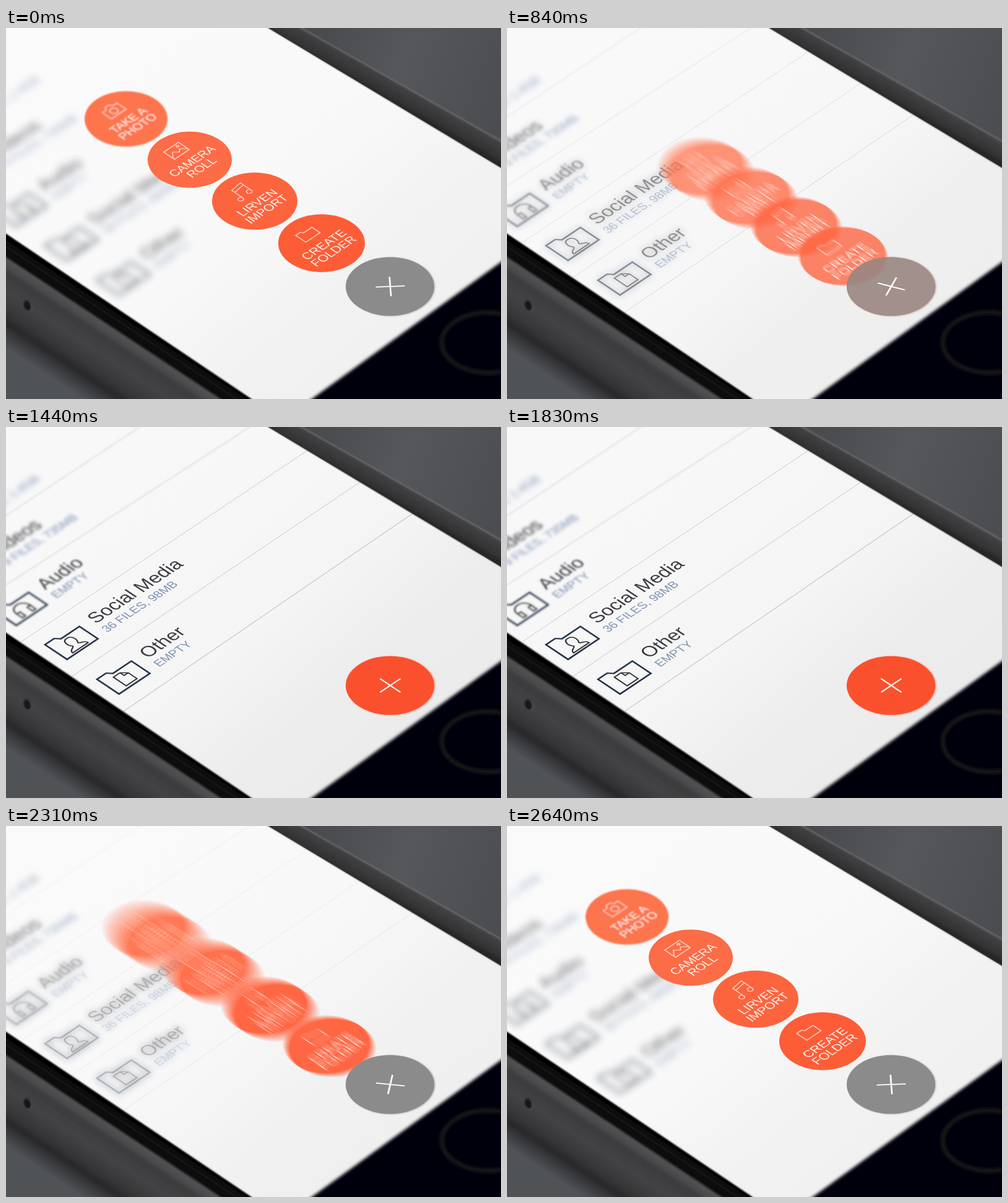
Write an HTML page that moves like this. It is 800 px wide and 600 px high and loops after 2670 ms.

```html
<!DOCTYPE html>
<html lang="en">
<head>
<meta charset="utf-8">
<title>File menu</title>
<style>
html, body { margin: 0; width: 100%; height: 100%; overflow: hidden; background: #46474b; }
svg { display: block; width: 800px; height: 600px; }
text { font-family: "Liberation Sans", Arial, sans-serif; }
.label { fill: #fff; fill-opacity: .92; font-size: 20px; text-anchor: middle; }
.line { fill: none; stroke: #fff; stroke-width: 1.6; stroke-opacity: .7; }
.title { fill: #3a3b3f; font-size: 30px; }
.sub { fill: #7c90b0; font-size: 19px; }
.folder { fill: none; stroke: #263448; stroke-width: 2.8; }
.glyph { fill: none; stroke: #303133; stroke-width: 2; }
.ghost { mix-blend-mode: plus-lighter; }
.disk { isolation: isolate; }
</style>
</head>
<body>
<svg viewBox="0 0 800 600">
  <defs id="defs">
    <linearGradient id="paper" gradientUnits="userSpaceOnUse" x1="200" y1="60" x2="620" y2="560">
      <stop offset="0" stop-color="#f8f8f9"/><stop offset=".5" stop-color="#f5f5f6"/>
      <stop offset=".75" stop-color="#ededee"/><stop offset="1" stop-color="#ebebec"/>
    </linearGradient>
    <linearGradient id="desk" gradientUnits="userSpaceOnUse" x1="470" y1="0" x2="800" y2="130">
      <stop offset="0" stop-color="#47484c"/><stop offset=".5" stop-color="#56575b"/>
      <stop offset="1" stop-color="#4c4d51"/>
    </linearGradient>
    <linearGradient id="side" gradientUnits="userSpaceOnUse" x1="0" y1="335" x2="-84" y2="462">
      <stop offset="0" stop-color="#020202"/><stop offset=".09" stop-color="#0b0b0b"/>
      <stop offset=".1" stop-color="#1c1c1d"/><stop offset=".12" stop-color="#070707"/>
      <stop offset=".18" stop-color="#0c0c0c"/><stop offset=".21" stop-color="#525254"/>
      <stop offset=".27" stop-color="#4b4b4d"/><stop offset=".33" stop-color="#3c3c3e"/>
      <stop offset=".5" stop-color="#434345"/><stop offset=".68" stop-color="#363638"/>
      <stop offset=".78" stop-color="#28282a"/><stop offset=".86" stop-color="#37383b"/>
      <stop offset="1" stop-color="#505257"/>
    </linearGradient>
    <linearGradient id="rim" gradientUnits="userSpaceOnUse" x1="600" y1="106" x2="616" y2="78">
      <stop offset="0" stop-color="#262627"/><stop offset=".25" stop-color="#333334"/>
      <stop offset=".8" stop-color="#3f3f41"/><stop offset="1" stop-color="#4a4a4c"/>
    </linearGradient>
  </defs>

  <rect width="800" height="600" fill="url(#desk)"/>
  <path d="M414-6L810 232V378L494 610H390L0 340V-6Z" fill="url(#paper)"/>
  <path id="veil" d="M414-6L810 232V378L494 610H390L0 340V-6Z" fill="#fff"/>
  <g id="soft"></g>
  <g id="list"></g>
  <g id="disks"></g>
  <g id="button"></g>

  <path d="M-20 319L397 600L420 620H-20Z" fill="url(#side)" filter="url(#b1)"/>
  <ellipse cx="36" cy="450" rx="6" ry="9" transform="rotate(-18 36 450)" fill="#535355" filter="url(#b1)"/>
  <ellipse cx="34.500" cy="449" rx="5.500" ry="8.500" transform="rotate(-18 34.500 449)" fill="#19191a" filter="url(#b1)"/>

  <path d="M472-2L810 188V232L414-6Z" fill="url(#rim)" filter="url(#b1)"/>
  <path d="M474-2L804 185" stroke="#737477" stroke-width="1.600" filter="url(#b1)"/>

  <path d="M494 600L820 364V620H466Z" fill="#060607" filter="url(#b3)"/>
  <path d="M800 462C745 452 698 482 705 515C712 548 760 562 800 556" fill="none" stroke="#131314" stroke-width="8" filter="url(#b3)"/>
</svg>
<script>
const $ = id => document.getElementById(id);
const LOOP = 2670, STEP = 30, COPIES = 9, SHUTTER = 15;
const HUB = [620, 418];
const tilt = (x, y, s = 1) =>
  `matrix(${.83 * s} ${-.555 * s} ${.83 * s} ${.555 * s} ${x} ${y})`;

const blurs = { b0: .4, b1: .9, b2: 1.5, b3: 2.6, b4: 4, b5: 6 };
let defs = Object.entries(blurs).map(([id, d]) =>
  `<filter id="${id}" filterUnits="userSpaceOnUse" x="-60" y="-60" width="920" height="720">
   <feGaussianBlur stdDeviation="${d}"/></filter>`).join('');

// File list
const glyphs = {
  phones: 'M17 35V27C17 9 43 9 43 27V35M17 27H23V38H17ZM37 27H43V38H37Z',
  person: 'M15 39C15 31 25 33 25 29C20 23 21 12 30 12C39 12 40 23 35 29C35 33 45 31 45 39Z',
  page: 'M19 13H32L40 21V38H19ZM32 13V21H40',
  none: ''
};
const rows = [
  [-172, 190, 'Photos', '124 FILES, 1.4GB', 'none', 'b4'],
  [-98, 244, 'Videos', '9 FILES, 735MB', 'none', 'b3'],
  [-19, 297, 'Audio', 'EMPTY', 'phones', 'b2'],
  [63, 352, 'Social Media', '36 FILES, 98MB', 'person', 'b0'],
  [147, 408, 'Other', 'EMPTY', 'page', '']
];
const row = ([x, y, title, sub, glyph]) => `<g transform="${tilt(x, y)}">
  <path class="folder" d="M0 0H18L24 7H60V43H0Z"/><path class="glyph" d="${glyphs[glyph]}"/>
  <text class="title" x="80" y="19.500">${title}</text><text class="sub" x="78" y="43">${sub}</text></g>`;
const focus = (id, body) => id ? `<g filter="url(#${id})">${body}</g>` : body;
const rule = (d, color, id) => focus(id, `<path d="${d}" stroke="${color}"/>`);

$('list').innerHTML =
  rule('M190 460L657 140', '#b3b4b7') + rule('M107 403L572 89', '#c6c7ca') +
  rule('M25 347L487 38', '#c9cacd', 'b0') + rule('M-10 262L397-2', '#c4c5c8', 'b1') +
  rule('M-10 150L222-4', '#c4c5c8', 'b2') +
  rows.map(r => focus(r[5], row(r))).join('');
$('soft').innerHTML = focus('b5', rows.map(row).join(''));

// Menu disks, from the farthest to the nearest
const disks = [
  [194, 147, .944, '#fd744d', 'b1', 'TAKE A', 'PHOTO',
    'M-15-7H-7L-4-12H4L7-7H15V12H-15ZM-6 2A6 6 0 1 0 6 2A6 6 0 1 0-6 2'],
  [297, 213, .958, '#fc6c46', 'b0', 'CAMERA', 'ROLL',
    'M-15-11H15V11H-15ZM-15 8L-6-2L1 5L6 0L15 8M6-6A2 2 0 1 0 10-6A2 2 0 1 0 6-6'],
  [402, 280, .972, '#fc643e', '', 'LIRVEN', 'IMPORT',
    'M-7 10V-12L13-15V7M-7-6L13-9M-15 10A4 4 0 1 0-7 10A4 4 0 1 0-15 10M5 7A4 4 0 1 0 13 7A4 4 0 1 0 5 7'],
  [510, 348, .986, '#fc5d37', '', 'CREATE', 'FOLDER',
    'M-14-10H-5L-2-6H14V10H-14Z']
];
disks.forEach(([, , , color, , top, low, icon], i) => {
  defs += `<g id="disk${i}"><circle r="60.5" fill="${color}"/>
    <path class="line" d="${icon}" transform="translate(0 -27)"/>
    <text class="label" y="11.500">${top}</text><text class="label" y="30.500">${low}</text></g>`;
});
$('defs').insertAdjacentHTML('beforeend', defs);
$('disks').innerHTML = disks.map((d, i) => `<g class="disk"${d[4] ? ` filter="url(#${d[4]})"` : ''}>` +
  `<use class="ghost" href="#disk${i}"/>`.repeat(COPIES) + '</g>').join('');
const groups = [...$('disks').children];

const face = (id, color) => `<g id="${id}">
  <ellipse cx="622" cy="418.500" rx="71" ry="47" fill="${color}" opacity=".75" filter="url(#b2)"/>
  <ellipse cx="620.500" cy="418" rx="71.500" ry="47.500" fill="${color}"/></g>`;
$('button').innerHTML = face('warm', '#fb502d') + face('cool', '#8b8b8b') +
  `<g transform="${tilt(621, 418)}"><path id="cross" d="M-20 0H20M0-20V20" stroke="#fff" stroke-width="2.300"/></g>`;

const ramp = (t, a, b) => Math.min(1, Math.max(0, (t - a) / (b - a)));
const ease = (t, a, b) => { const u = ramp(t, a, b); return u * u * (3 - 2 * u); };

// How far the disks are out; opening overshoots a little
function spread(t) {
  if (t < 1400) return 1 - ease(t, 680, 1120);
  return 1.07 * ease(t, 2170, 2360) - .07 * ease(t, 2360, 2460);
}
const shade = t => t < 1400 ? 1 - ramp(t, 715, 965) : ramp(t, 2190, 2350);

function draw(t) {
  const k = shade(t), f = spread(t), half = SHUTTER / 2;
  const moving = Math.abs(spread(t + half) - spread(t - half)) > 1e-4;
  $('veil').setAttribute('opacity', .25 * k);
  $('list').setAttribute('opacity', 1 - k);
  $('soft').setAttribute('opacity', .75 * k);
  $('warm').setAttribute('opacity', 1 - k);
  $('cool').setAttribute('opacity', Math.min(1, 1.6 * k));
  $('cross').setAttribute('transform', `rotate(${-48 * k})`);
  groups.forEach((g, i) => {
    const [x, y, size] = disks[i];
    g.style.display = f > 0 ? '' : 'none';
    g.setAttribute('opacity', Math.min(1, .1 + f));
    [...g.children].forEach((copy, j) => {
      const p = moving ? spread(t - half + SHUTTER * j / (COPIES - 1)) : f;
      copy.setAttribute('transform',
        tilt(HUB[0] + (x - HUB[0]) * p, HUB[1] + (y - HUB[1]) * p, 1 + (size - 1) * p));
      copy.setAttribute('opacity', moving ? 1 / COPIES : j ? 0 : 1);
    });
  });
}

const start = performance.now();
function tick() {
  const t = (performance.now() - start) % LOOP;
  draw(Math.floor(t / STEP) * STEP);
  requestAnimationFrame(tick);
}
tick();
</script>
</body>
</html>
```
